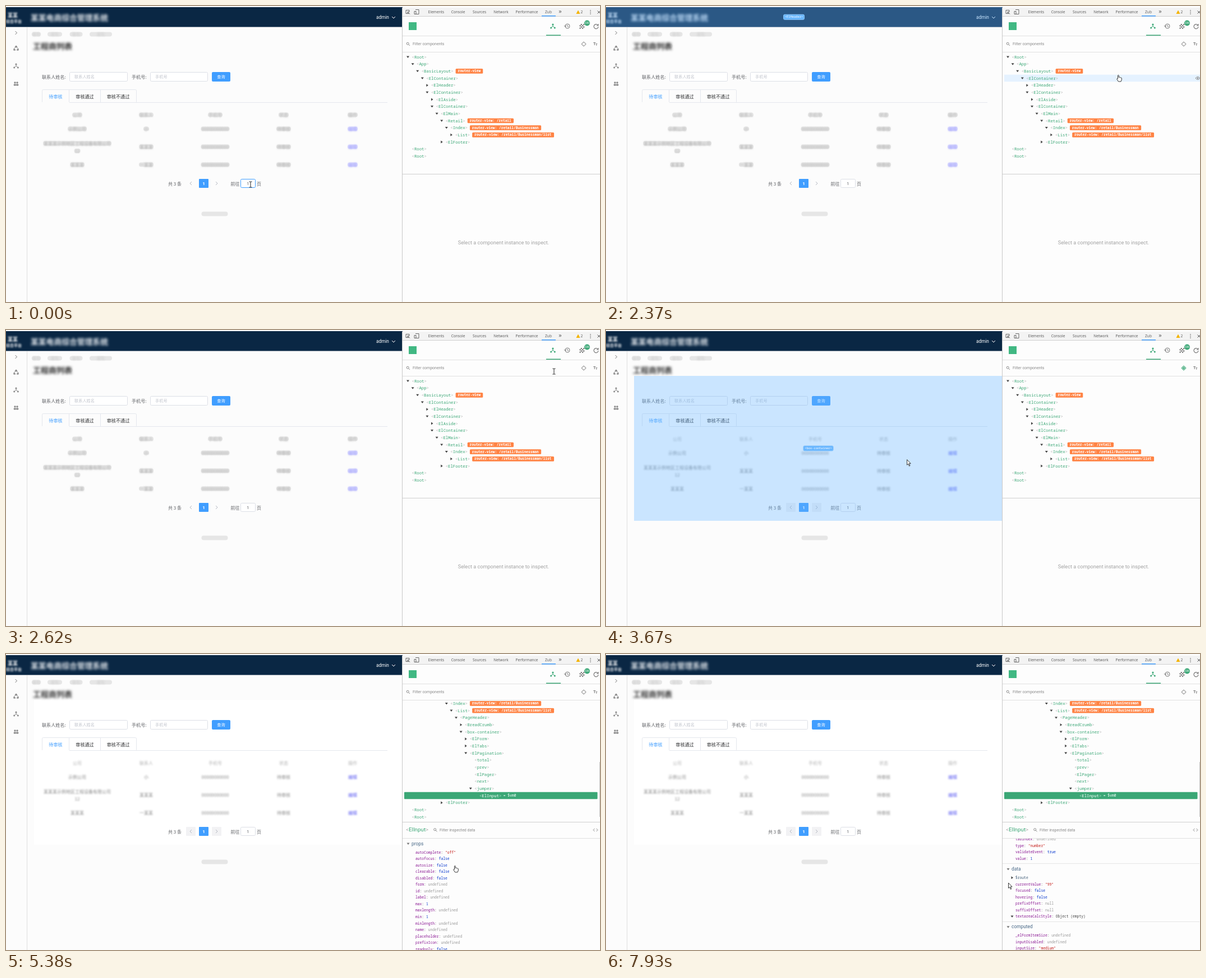
Animation of 1059 by 529 pixels, one loop 8 s. Source, as an HTML page with a canvas:

```html
<!DOCTYPE html>
<html lang="zh">
<head>
<meta charset="utf-8">
<style>
html, body { margin: 0; width: 100%; height: 100%; overflow: hidden; background: #fcfcfc; }
canvas { display: block; width: 1059px; height: 529px; }
</style>
</head>
<body>
<canvas id="stage" width="1059" height="529"></canvas>
<script>
const LOOP = 8000, W = 1059, H = 529;
const SANS = 'Roboto, "Noto Sans CJK SC", "Noto Sans CJK", sans-serif';
const CJK = '"Noto Sans CJK SC", "Noto Sans CJK", sans-serif';
const UI = '"Open Sans", sans-serif';
const MONO = '"Noto Sans Mono", monospace';
const GREEN = '#3ba776', BLUE = '#409eff', GREY = '#8a8a8a';
const screen = document.getElementById('stage').getContext('2d');
let g = screen;

// ---- drawing helpers ----
function text(s, x, y, size, color, font = SANS, align = 'left', weight = 400) {
  g.font = `${weight} ${size}px ${font}`;
  g.textAlign = align;
  g.textBaseline = 'middle';
  g.fillStyle = color;
  g.fillText(s, x, y + .5);
  return g.measureText(s).width;
}
function rect(x, y, w, h, color) { g.fillStyle = color; g.fillRect(x, y, w, h); }
function box(x, y, w, h, r, fill, stroke) {
  g.beginPath();
  g.roundRect(x, y, w, h, r);
  if (fill) { g.fillStyle = fill; g.fill(); }
  if (stroke) { g.strokeStyle = stroke; g.lineWidth = 1; g.stroke(); }
}
function path(d, x, y, stroke, fill, width = 1) {
  const p = new Path2D(d);
  g.save();
  g.translate(x, y);
  g.lineWidth = width;
  g.lineJoin = 'round';
  if (fill) { g.fillStyle = fill; g.fill(p); }
  if (stroke) { g.strokeStyle = stroke; g.stroke(p); }
  g.restore();
}
function circle(x, y, r, fill, stroke, width = 1) {
  g.beginPath();
  g.arc(x, y, r, 0, 7);
  if (fill) { g.fillStyle = fill; g.fill(); }
  if (stroke) { g.strokeStyle = stroke; g.lineWidth = width; g.stroke(); }
}
function triangle(x, y, open, color = '#444') {
  path(open ? 'M-2.5-1.5H2.5L0 2Z' : 'M-1.5-2.5V2.5L2 0Z', x, y, null, color);
}
function search(x, y) {
  circle(x - .8, y - .8, 2, null, GREY);
  path('M.7.7L3 3', x, y, GREY);
}
function nodes(x, y, color) {
  circle(x, y - 3, 1.6, color);
  circle(x - 3.3, y + 3, 1.5, color);
  circle(x + 3.3, y + 3, 1.5, color);
  path('M0-2V0L-3 3M0 0L3 3', x, y, color);
}
function blurred(s, x, y, size, color, amount, align = 'center', weight = 400) {
  g.filter = `blur(${amount}px)`;
  text(s, x, y, size, color, CJK, align, weight);
  g.filter = 'none';
}
function pill(x, y, w, color = '#e6e6e6') {
  g.filter = 'blur(.5px)';
  box(x - w / 2, y - 3.5, w, 8, 4, color);
  g.filter = 'none';
}

// ---- left page ----
const COLUMNS = [127, 250, 373, 495, 618];
const ROWS = [
  [194, '公司', '联系人', '手机号', '状态', '操作'],
  [219, '示例公司', '小', '00000000000', '待审核', '编辑'],
  [251, '', '某某某', '00000000000', '待审核', '编辑'],
  [283, '某某某', '一某某', '00000000000', '待审核', '编辑'],
];
function drawPage(soft) {
  rect(0, 0, W, H, '#fcfcfc');
  if (soft) rect(50, 82, 656, 259, '#fff');
  rect(0, 2, 707, 35.5, '#0a2744');
  blurred('某某', 12, 16, 9, '#fff', 1.6, 'center', 900);
  blurred('综合平台', 14, 27, 7, '#fff', 1.6, 'center', 700);
  blurred('某某电商综合管理系统', 44, 20, 13.8, '#e4e9ee', 2.2, 'left', 700);
  text('admin', 660, 20, 8.2, '#fff');
  path('M-3-1.5L0 1.5L3-1.5', 691, 20.5, '#fff');

  rect(37, 38, 1, H, '#dedede');
  path('M-1.5-3L1.5 0L-1.5 3', 18, 48, '#777');
  path('M-2-1L0-4L2-1M3 0L4 3H1M-1 3H-4L-3 0', 18, 75.5, GREY, null, 1.8);
  nodes(18, 107, GREY);
  for (const s of [-1, 1]) {
    circle(18 + 2 * s, 137, 1.7, GREY);
    box(18 + 2.2 * s - 2.1, 139.5, 4.2, 3, 1, GREY);
  }

  [[54, 16], [87, 26], [125, 23], [169, 40]].forEach(([x, w]) => {
    pill(x, 50, w);
    blurred('面包', x, 50, 7, '#ccc', 1.5);
  });
  if (!soft) pill(84, 71, 70, '#eee');
  blurred('工程商列表', 48, 71, 14, '#333', 2, 'left', 700);
  pill(372, 371, 47);

  text('联系人姓名:', 64, 126, 8.1, '#606266', CJK);
  text('手机号:', 224, 126, 8.1, '#606266', CJK);
  box(113.5, 118.5, 103, 16, 2, '#fff', '#dcdfe6');
  box(257.5, 118.5, 102, 16, 2, '#fff', '#dcdfe6');
  text('联系人姓名', 122, 126, 7.2, '#c0c4cc', CJK);
  text('手机号', 266, 126, 7.2, '#c0c4cc', CJK);
  box(367, 118, 33, 17, 2, BLUE);
  text('查询', 383.5, 126, 7.2, '#fff', CJK, 'center');

  box(64.5, 149.5, 168, 24, 2, null, '#e4e7ed');
  rect(64, 172, 616, 3, soft ? '#fff' : '#fcfcfc');
  rect(113, 172, 567, 1, '#e4e7ed');
  rect(112, 150, 1, 22, '#e4e7ed');
  rect(168, 150, 1, 22, '#e4e7ed');
  text('待审核', 88.5, 161, 8.1, BLUE, CJK, 'center');
  text('审核通过', 140.5, 161, 8.1, '#303133', CJK, 'center');
  text('审核不通过', 200, 161, 8.1, '#303133', CJK, 'center');

  const cell = (s, x, y, link) => {
    g.font = `8px ${CJK}`;
    if (!soft) pill(x, y, g.measureText(s).width + 2, link ? '#dcdcff' : '#e6e6e6');
    const color = link ? (soft ? '#5a5af0' : '#9a9af8') : y < 200 ? '#b0b0b0' : soft ? '#888' : '#a8a8a8';
    blurred(s, x, y, 8, color, 1.5);
  };
  for (const [y, ...cells] of ROWS)
    cells.forEach((s, i) => s && cell(s, COLUMNS[i], y, i === 4 && y > 200));
  cell('某某某示例地区工程设备有限公司', 127, 245);
  cell('12', 127, 258.5);

  text('共 3 条', 289, 317, 8, '#606266', CJK);
  if (soft) for (const x of [321, 367]) box(x, 309, 17, 16, 1, '#f2f2f4');
  path('M1.5-3L-1.5 0L1.5 3', 329.5, 317, '#b4b8c0');
  path('M-1.5-3L1.5 0L-1.5 3', 375.5, 317, '#b4b8c0');
  box(344, 309, 17, 16, 1, BLUE);
  text('1', 352.5, 317, 8, '#fff', SANS, 'center', 700);
  text('前往', 400.5, 317, 8, '#606266', CJK);
  text('页', 447, 317, 8, '#606266', CJK);
}
const pages = [false, true].map(soft => {
  const c = document.createElement('canvas');
  c.width = W; c.height = H;
  g = c.getContext('2d');
  drawPage(soft);
  return c;
});

// ---- component tree: [level, name, arrow (o open, c closed), route tag] ----
const HEAD = [
  [0, 'Root', 'o'], [1, 'App', 'o'], [2, 'BasicLayout', 'o', 'router-view'],
  [3, 'ElContainer', 'o'], [4, 'ElHeader', 'c'], [4, 'ElContainer', 'o'],
  [5, 'ElAside', 'c'], [5, 'ElContainer', 'o'], [6, 'ElMain', 'o'],
  [7, 'Retail', 'o', 'router-view: /retail'],
  [8, 'Index', 'o', 'router-view: /retail/Businessman'],
];
const LIST = [9, 'List', 'c', 'router-view: /retail/Businessman/list'];
const INNER = [
  [10, 'PageHeader', 'o'], [11, 'BreadCrumb', 'c'], [11, 'box-container', 'o'],
  [12, 'ElForm', 'c'], [12, 'ElTabs', 'c'], [12, 'ElPagination', 'o'],
  [13, 'total'], [13, 'prev'], [13, 'ElPager'], [13, 'next'], [13, 'jumper', 'o'], [14, 'ElInput'],
];
const TAIL = [[7, 'ElFooter', 'c'], [0, 'Root'], [0, 'Root']];
const COLLAPSED = [...HEAD, LIST, ...TAIL];
const EXPANDED = [...HEAD, [9, 'List', 'o', LIST[3]], ...INNER, ...TAIL];

function clipped(y, h, draw) {
  g.save();
  g.beginPath();
  g.rect(707, y, W - 707, h);
  g.clip();
  draw();
  g.restore();
}
function tree(expanded, hovered) {
  (expanded ? EXPANDED : COLLAPSED).forEach(([level, name, arrow, tag], i) => {
    const y = 91 + i * 12.66 - (expanded ? 129.2 : 0), x = 716.5 + level * 8.6;
    const picked = expanded && name === 'ElInput';
    if (picked) box(710, y - 6.3, 344.5, 12.5, 1, GREEN);
    if (i === hovered) {
      rect(710, y - 6.3, 349, 12.6, '#e5f2ff');
      path('M-4 0Q0-5 4 0Q0 5-4 0Z', 1055, y, GREY);
      circle(1055, y, 1.3, GREY);
    }
    if (arrow) triangle(x, y, arrow === 'o');
    let tx = x + 7;
    const bracket = picked ? '#b9dfce' : '#b5b5b5';
    tx += text('<', tx, y, 7.3, bracket, MONO);
    tx += text(name, tx, y, 7.3, picked ? '#fff' : GREEN, MONO);
    tx += text('>', tx, y, 7.3, bracket, MONO);
    if (picked) text('= $vm0', tx + 3.5, y, 6.3, '#fff', MONO);
    if (tag) {
      box(tx + 4, y - 4.3, tag.length * 3.74 + 7.5, 8.7, 1.5, '#ff8344');
      text(tag, tx + 7.8, y - .2, 6.2, '#fff', MONO, 'left', 700);
    }
  });
}

// ---- inspector ----
const SECTIONS = [
  ['props', 339, 'autoComplete:"off"|autofocus:false|autosize:false|clearable:false|disabled:false|form|id|label|max:1|maxlength|min:1|minlength|name|placeholder|prefixIcon|readonly:false|resize|rows:2|size|step|suffixIcon|tabindex|type:"number"|validateEvent:true|value:1'],
  ['data', 650, '$route:+|currentValue:"99"|focused:false|hovering:false|prefixOffset:null|suffixOffset:null|textareaCalcStyle:Object (empty)'],
  ['computed', 753.3, '_elFormItemSize|inputDisabled|inputSize:"medium"|isGroup|needStatusIcon:false|showClear:false|textareaStyle:Object (empty)|validateIcon|validateState:""'],
];
const valueColor = v => v[0] === '"' ? '#c41a16' : v[0] === 'O' ? '#444'
  : /null|undef/.test(v) ? '#999' : '#0033cc';
function inspector(scroll, editing) {
  for (const [title, top, rows] of SECTIONS) {
    const y = top - scroll;
    if (title !== 'props') rect(707, Math.round(y - 10), 351, 1, '#e6e6e6');
    triangle(717, y, true, '#777');
    text(title, 723, y - .3, 8.4, '#486887');
    rows.split('|').forEach((row, i) => {
      const [key, value = 'undefined'] = row.split(':'), ry = y + 15.4 + i * 11.53;
      if (value === '+') {
        triangle(724, ry, false);
        text(key, 730, ry, 6.3, '#3d5a76', MONO);
        return;
      }
      if (value[0] === 'O') triangle(724, ry, true);
      const w = text(key, 730, ry, 6.3, '#881391', MONO);
      text(':', 730 + w, ry, 6.3, '#666', MONO);
      text(value, 730 + w + 7.6, ry, 6.3, valueColor(value), MONO);
      if (editing && key === 'hovering') {
        path('M-3 3L-2 1L2-3L3-2L-1 2Z', 796, ry, '#666', '#666', .7);
        box(805.5, ry - 3, 6, 6, 1, null, '#777');
      }
    });
  }
}

function devtools(t, scroll) {
  const picked = t >= 4450, picking = t >= 3400 && !picked;
  rect(707, 0, W, H, '#fdfdfd');
  rect(707, 3, W, 15, '#f3f3f3');
  rect(707, 18, W, 1, '#d0d0d0');
  rect(706, 3, 1, H, '#c9c9c9');
  path('M3 2H-3V-4H3V-1M0-1L4 3M0-1V2M0-1H3', 716, 11.5, '#666');
  path('M-2-4H4V4H-1M-4-1H-1V4H-4Z', 732, 10.5, '#666');
  [['Elements', 767], ['Console', 806], ['Sources', 844], ['Network', 882.5],
    ['Performance', 928.5], ['Zub', 967]].forEach(([s, x]) => text(s, x, 10.3, 6.6, '#555', UI, 'center'));
  rect(955, 17, 25, 1.5, BLUE);
  text('»', 988, 9.5, 11, '#555', UI, 'center');
  path('M0-3.5L3.5 3H-3.5Z', 1020, 11, null, '#f4b400');
  text('2', 1024.5, 10.5, 6.6, '#555', UI);
  for (const d of [-3, 0, 3]) circle(1042, 11 + d, .8, '#555');
  path('M-2.5-2.5L2.5 2.5M2.5-2.5L-2.5 2.5', 1057, 11, '#555');

  rect(718, 29, 14, 14, '#41b883');
  nodes(975, 36, GREEN);
  rect(963, 51.5, 26, 1.5, GREEN);
  circle(1001, 36, 4, null, '#777');
  path('M0-2V0L2 1M-6-1L-4 1L-2-1', 1001, 36, '#777');
  for (let i = 0; i < 16; i++)
    if ((i + (i >> 2)) % 2) rect(1022.5 + i % 4 * 2.2, 32 + (i >> 2) * 2.2, 2.2, 2.2, '#777');
  circle(1036, 30.5, 5, GREEN);
  text(t < 1150 ? '330' : '336', 1036, 30, 4.8, '#fff', SANS, 'center');
  path('M3-2A4 4 0 1 0 4 1M4-4V-1H1', 1052, 36, '#777', null, 1.2);
  rect(707, 53, W, 1, '#e0e0e0');
  search(717, 68);
  text('Filter components', 725, 67.5, 7, GREY);
  const aim = picking ? GREEN : GREY;
  circle(1030, 68, 3.1, picking ? '#bfe3d3' : null, aim, .9);
  path('M0-4.5V-3M0 3V4.5M-4.5 0H-3M3 0H4.5', 1030, 68, aim);
  if (picking) circle(1030, 68, 1.6, GREEN);
  text('T', 1047, 67.5, 7.2, '#777', SANS, 'left', 700);
  text('T', 1051, 68.3, 5.8, '#777', SANS, 'left', 700);
  rect(707, 82, W, 1, '#e0e0e0');

  const hovered = t >= 2250 && t < 2370 ? 5 : t >= 2370 && t < 2500 ? 3 : t >= 2500 && t < 2620 ? 1 : -1;
  clipped(83, 217, () => tree(picked, hovered));
  rect(707, 300, W, 1, '#cfcfcf');
  if (!picked) {
    text('Select a component instance to inspect.', 887, 423, 9.15, '#a2a2a2', SANS, 'center');
    return;
  }
  rect(1058, 193, 1, 98, '#c4c4c4');
  let x = 713;
  x += text('<', x, 313.5, 9.8, '#aaa');
  x += text('ElInput', x, 313.5, 9.8, GREEN);
  text('>', x, 313.5, 9.8, '#aaa');
  search(765.5, 314.5);
  text('Filter inspected data', 773, 314, 7, GREY);
  path('M-1.5-2.5L-4 0L-1.5 2.5M1.5-2.5L4 0L1.5 2.5', 1051, 314.5, '#888');
  rect(707, 329, W, 1, '#e0e0e0');
  clipped(330, 199, () => inspector(scroll, t >= 6000 && t < 6460));
}

// ---- component highlight over the page ----
function highlight(x, y, w, h, name) {
  rect(x, y, w, h, 'rgba(104,182,255,.35)');
  const cx = x + w / 2, cy = y + h / 2, pw = name.length * 3.25 + 11;
  box(cx - pw / 2, cy - 4.5, pw, 9, 2, '#68b6ff', '#8cc6fb');
  text(`<${name}>`, cx, cy - .3, 5.4, '#fff', MONO, 'center');
}
const HIGHLIGHTS = [
  [2250, 2370, 38, 38, 669, 491, 'ElContainer'],
  [2370, 2500, -37, 2, 744, 35.5, 'ElHeader'],
  [2500, 2620, -37, 2, 744, 527, 'ElContainer'],
  [3530, 3790, 50, 82, 657, 259, 'box-container'],
  [3790, 4450, 418, 309, 27, 16.5, 'ElInput'],
];

// ---- motion ----
const CURSOR = [
  [0, 436, 319, 'beam'], [680, 436, 319, 'arrow'], [1150, 462, 334, 'arrow'], [1680, 491, 316, 'arrow'],
  [1970, 578, 330, 'arrow'], [2140, 578, 330, 'arrow'], [2250, 850, 165, 'hand'], [2370, 915, 129, 'hand'],
  [2490, 915, 129, 'hand'], [2620, 977, 74, 'beam'], [2740, 977, 74, 'beam'], [3150, 1031, 72, 'hand'],
  [3400, 1031, 72, 'hand'], [3530, 780, 105, 'arrow'], [3660, 550, 230, 'arrow'], [3790, 428, 321, 'beam'],
  [4450, 430, 320, 'beam'], [4700, 480, 325, 'arrow'], [5060, 740, 370, 'hand'], [5380, 802, 384, 'hand'],
  [5520, 802, 384, 'hand'], [6070, 806, 398, 'hand'], [7570, 804, 411, 'hand'], [7690, 780, 412, 'arrow'],
  [7930, 720.5, 415, 'arrow'], [LOOP, 720.5, 415, 'arrow'],
];
const SCROLL = [[0, 0], [5520, 0], [6060, 320], [6190, 320], [6460, 347], [6580, 347], [7500, 265.6], [LOOP, 265.6]];
function sample(keys, t) {
  const i = keys.findIndex(k => k[0] > t), a = keys[i - 1], b = keys[i];
  const p = (t - a[0]) / (b[0] - a[0]);
  return a.map((v, j) => typeof v === 'number' ? v + (b[j] - v) * p : v);
}
function cursor([, x, y, kind]) {
  if (kind === 'beam') path('M-2.5-5H-.7L0-4.5L.7-5H2.5M0-4.5V4.5M-2.5 5H-.7L0 4.5L.7 5H2.5', x, y, '#222');
  else if (kind === 'arrow') path('M-3-6V3.5L-.8 1.5L.8 5.5L2.3 4.8L.7 1H3.6Z', x, y, '#222', '#fff', .9);
  else path('M-2.5 1V-5Q-1.6-6.6-.7-5V-1.5Q.5-2.5 1.1-1.2Q2.3-2 2.8-.7Q4-1.2 4.3 0V3L3 6H-1.5L-4.3 1.5Q-4 0-2.5 1Z',
    x, y, '#222', '#fff', .9);
}

function frame(now) {
  const t = now % LOOP;
  g = screen;
  g.drawImage(pages[t >= 3530 ? 1 : 0], 0, 0);
  const value = t < 280 || t >= 1150 ? '1' : t < 400 ? '9' : '99';
  box(418.5, 309.5, 26, 15, 2, '#fff', t < 1150 ? BLUE : '#dcdfe6');
  text(value, 431.3, 317, 7.6, '#606266', SANS, 'center');
  for (const [from, to, ...area] of HIGHLIGHTS) if (t >= from && t < to) highlight(...area);
  devtools(t, sample(SCROLL, t)[1]);
  cursor(sample(CURSOR, t));
  requestAnimationFrame(frame);
}
requestAnimationFrame(frame);
</script>
</body>
</html>
```
